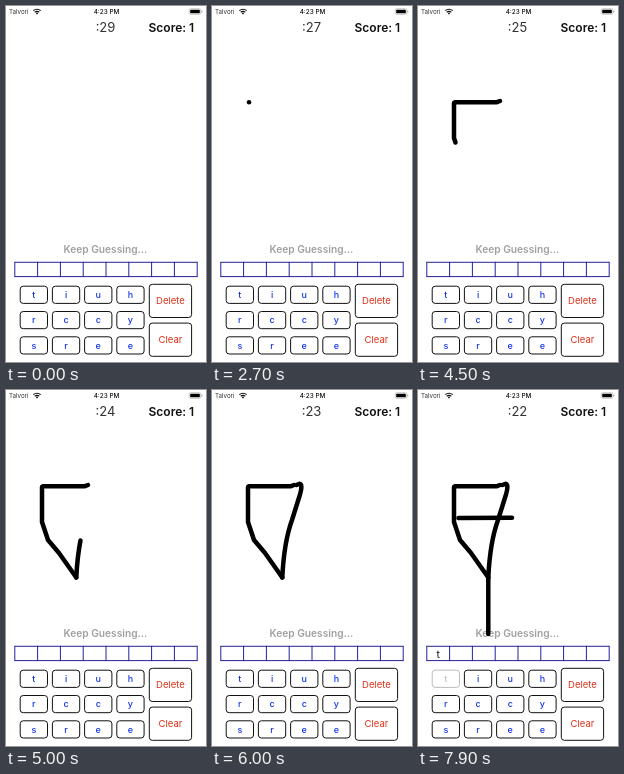
Recreate the animation shown at these times as an HTML page. Size 200 px wide and 356 px high, loop 8 s.

```html
<!DOCTYPE html>
<html lang="en">
<head>
<meta charset="utf-8">
<style>
html, body { margin: 0; height: 100%; overflow: hidden; background: #fff; }
svg { display: block; width: 100vw; height: 100vh; font-family: Inter, Roboto, sans-serif; }
text { text-anchor: middle; }
.box { fill: #fff; stroke: #111; }
.key text { fill: #1433ee; font-size: 9px; font-weight: 500; }
.pressed text { opacity: .35; }
.used text { fill: #c4c4c4; }
.used .box { stroke: #bbb; }
.action text { fill: #e0301a; font-size: 9.5px; }
.ink { fill: none; stroke: #000; stroke-width: 4.5; stroke-linecap: round; stroke-linejoin: round; }
</style>
</head>
<body>
<svg id="stage" viewBox="0 0 200 356">
  <text x="3" y="7.8" font-size="6.2" fill="#333" style="text-anchor:start">Talvori</text>
  <g fill="none" stroke="#111" stroke-width="1.1">
    <path d="M27.3 4.6Q31 1.8 34.7 4.6M28.7 6.2Q31 4.5 33.3 6.2"/>
    <circle cx="31" cy="7.4" r=".4"/>
  </g>
  <text x="100.5" y="7.8" font-size="6.4" font-weight="500" fill="#111">4:23 PM</text>
  <rect x="183.2" y="2.7" width="11.6" height="5.6" rx="1.4" fill="#fff" stroke="#999" stroke-width=".5"/>
  <rect x="184.2" y="3.7" width="9.6" height="3.6" rx=".6"/>
  <rect x="195.4" y="4.5" width=".9" height="2" rx=".4" fill="#888"/>
  <text id="timer" x="99.5" y="26" font-size="13" fill="#333"></text>
  <text x="188.2" y="26" font-size="12" font-weight="600" fill="#111" style="text-anchor:end">Score: 1</text>
  <text x="99.4" y="246.5" font-size="10.2" font-weight="600" fill="#a0a0a0">Keep Guessing...</text>
  <path id="cells" fill="none" stroke="#22229c"/>
  <text id="guess" x="20.3" y="267.5" font-size="10.5" fill="#111">t</text>
  <g id="keys"></g>
  <g id="drawing"></g>
</svg>
<script>
const LOOP = 8000, STEP = 100;
const $ = id => document.getElementById(id);

function add(parent, tag, attrs, text = '') {
  const el = document.createElementNS('http://www.w3.org/2000/svg', tag);
  for (const name in attrs) el.setAttribute(name, attrs[name]);
  el.textContent = text;
  parent.append(el);
  return el;
}

function button(x, y, w, h, label, type) {
  const g = add($('keys'), 'g', { class: type });
  add(g, 'rect', { x, y, width: w, height: h, rx: 3, class: 'box' });
  add(g, 'text', { x: x + w / 2, y: y + h / 2 + 3.3 }, label);
  return g;
}

const keys = [...'tiuhrccysree'].map((letter, i) =>
  button(14.2 + i % 4 * 32.2, 280.2 + (i >> 2) * 25.3, 27.3, 17.2, letter, 'key'));
['Delete', 'Clear'].forEach((label, i) =>
  button(143.3, 278.3 + i * 38.8, 42.3, 33.2, label, 'action'));

let grid = 'M8.8 256.3H191.2M8.8 270.6H191.2';
for (let i = 0; i <= 8; i++) grid += `M${8.8 + i * 22.8} 255.8V271.1`;
$('cells').setAttribute('d', grid);

const smooth = u => u * u * (3 - 2 * u);
const easeIn = u => u ** 3;
const easeOut = u => 1 - (1 - u) ** 3;

// Each finger stroke is revealed along its path between start and end
const strokes = [
  { d: 'M37 96.2H79L82 95', start: 2700, end: 3300, ease: smooth },
  { d: 'M36 97V132L42 150L53 163L70.3 187.5', start: 4200, end: 4900, ease: smooth },
  { d: 'M70.3 187.5Q72 152 80 130L88 104.5Q91 94 87.5 93.7L84.5 95', start: 4900, end: 5600, ease: easeOut },
  { d: 'M70.3 188V244', start: 6300, end: 6600, ease: smooth },
  { d: 'M40.5 128L94 127.7', start: 7200, end: 7500, ease: easeIn }
];
for (const s of strokes) s.el = add($('drawing'), 'path', { d: s.d, class: 'ink', pathLength: 1 });

function reveal({ el, start, end, ease }, t) {
  const u = Math.min(1, Math.max(0, (t - start) / (end - start)));
  el.style.visibility = t < start ? 'hidden' : 'visible';
  el.style.strokeDasharray = `${Math.max(.001, ease(u))} 2`;
}

function frame() {
  const t = Math.floor(performance.now() % LOOP / STEP) * STEP;
  $('timer').textContent = ':' + (29 - Math.floor(t / 1000));
  for (const s of strokes) reveal(s, t);
  const used = t >= 7800;
  keys[0].setAttribute('class', 'key' + (used ? ' used' : t >= 7700 ? ' pressed' : ''));
  $('guess').style.visibility = used ? 'visible' : 'hidden';
  requestAnimationFrame(frame);
}
frame();
</script>
</body>
</html>
```
